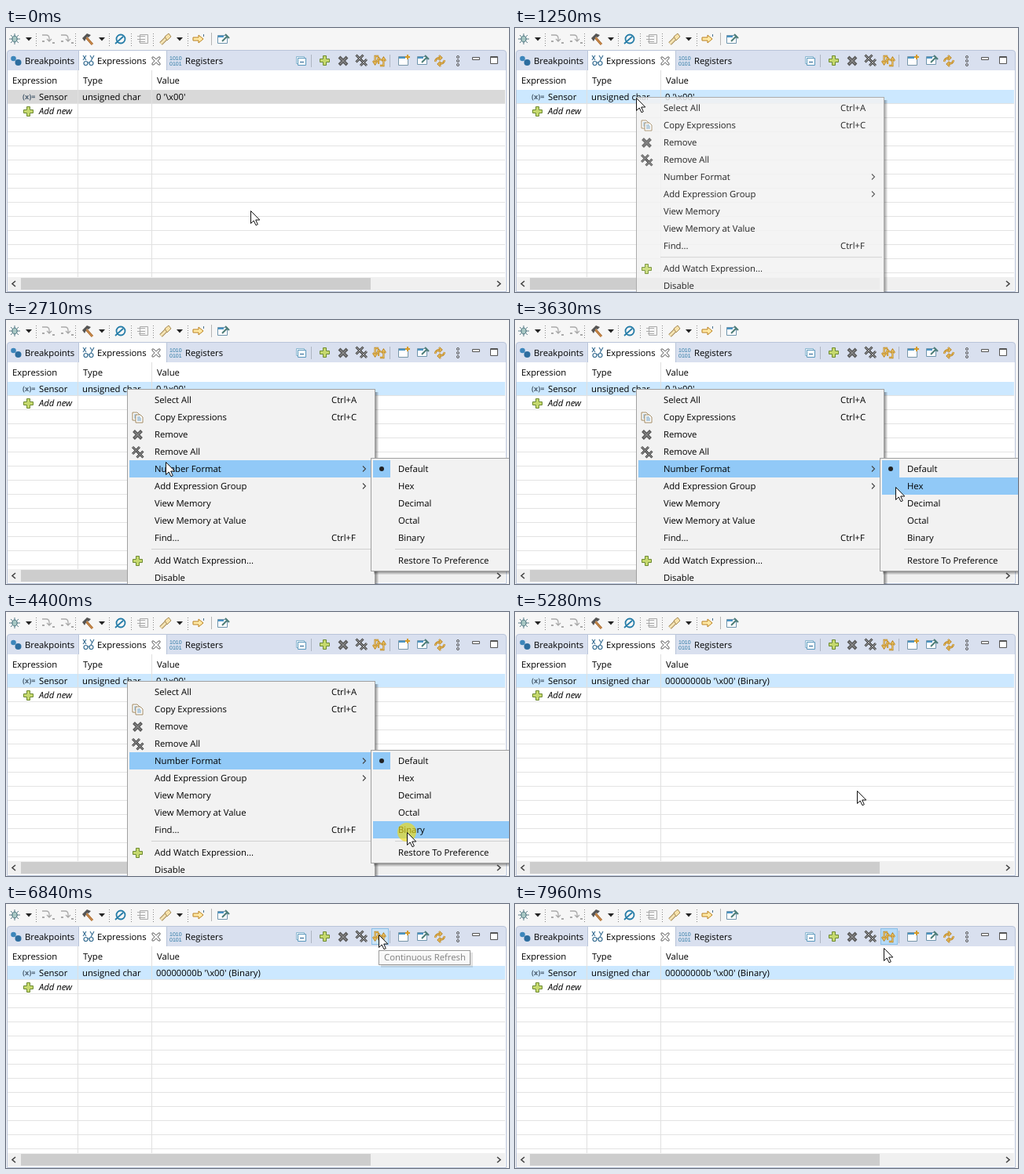
Recreate the animation shown at these times as an HTML page with a canvas. Size 640 by 337 pixels, loop 8 s.

```html
<!DOCTYPE html>
<html lang="en">
<head>
<meta charset="utf-8">
<title>Expressions view</title>
<style>
html, body { margin: 0; width: 100%; height: 100%; overflow: hidden; background: #f6f6f6; }
canvas { display: block; }
</style>
</head>
<body>
<canvas id="stage" width="640" height="337"></canvas>
<script>
const LOOP = 8000;
const HOT = '#91c9f7', GOLD = '#d59a25', GRAY = '#aaa';
const c = document.getElementById('stage').getContext('2d');

// Drawing helpers
const box = (color, x, y, w, h) => { c.fillStyle = color; c.fillRect(x, y, w, h); };
const frame = (color, x, y, w, h) => { c.strokeStyle = color; c.lineWidth = 1; c.strokeRect(x + .5, y + .5, w - 1, h - 1); };
const fill = (color, d) => { c.fillStyle = color; c.fill(new Path2D(d)); };
const stroke = (color, d, width = 1) => { c.strokeStyle = color; c.lineWidth = width; c.stroke(new Path2D(d)); };
const shape = (inside, edge, d) => { fill(inside, d); stroke(edge, d); };
const disc = (color, x, y, r) => { c.fillStyle = color; c.beginPath(); c.arc(x, y, r, 0, 7); c.fill(); };
function text(s, x, y, style = '', color = '#000') {
  c.font = style + ' 11.3px "Open Sans", "Noto Sans", sans-serif';
  c.fillStyle = color;
  c.fillText(s, x, y);
}
function at(x, y, draw) { c.save(); c.translate(x, y); draw(); c.restore(); }

// Icons, each drawn around its own centre
const icons = {
  bug() {
    stroke('#587d86', 'M-5-5L5 5M5-5L-5 5M-7 0H7M0-7V7');
    shape('#a9c8c4', '#47707c', 'M-3-2Q0-6 3-2V2Q0 6-3 2Z');
  },
  drop() { fill('#222', 'M-4-2H4L0 2.5Z'); },
  step() {
    stroke(GRAY, 'M-8-5H-3Q1-5 1-1V3M-2 0L1 3 4 0', 1.3);
    box(GRAY, -8, 2, 3, 2);
    box(GRAY, 5, 4, 3, 2);
  },
  hammer() {
    stroke('#a8642b', 'M-2-2L6 7', 3);
    stroke('#e0aa62', 'M-2-2L6 7');
    fill('#555', 'M-7-1L-1-7 4-5 1-2-1-3-4 3Z');
  },
  noEntry() {
    stroke('#267da8', 'M5.5 0A5.5 5.5 0 1 1-5.5 0A5.5 5.5 0 1 1 5.5 0M-7 6L3-3', 1.8);
  },
  list() {
    shape('#f4f4f4', GRAY, 'M-3.5-5.5H6.5V5.5H-3.5Z');
    stroke(GRAY, 'M-7-3.5H3M-7 .5H3M-5 3.5H3');
  },
  torch() {
    stroke('#a58a55', 'M-6 6L1-1', 5);
    stroke('#f4e4b4', 'M-6 6L1-1', 3);
    shape('#f8e2aa', '#a58a55', 'M-1-3L4-7 7-3 2 2Z');
  },
  jump() {
    shape('#ffe9a5', '#bb8120', 'M-6-2H1V-5L7 0 1 5V2H-6Z');
    stroke('#47708e', 'M7.5-6V-3');
  },
  pinned() {
    shape('#fff', '#6f94ad', 'M-7.5-4.5H4.5V5.5H-7.5Z');
    box('#4a94c3', -7, -4, 7, 2);
    stroke('#4d7d78', 'M-2 3L5-4M2-6L7-1', 2);
  },
  glasses() {
    stroke('#356c91', 'M-7-6L-3 0M-3-6L-7 0M2-6L4.5-2M7-6L3 1', 1.1);
    stroke('#356c91', 'M-1 4A2.5 2.5 0 1 1-6 4A2.5 2.5 0 1 1-1 4M6 4A2.5 2.5 0 1 1 1 4A2.5 2.5 0 1 1 6 4M-1 3H1', 1.2);
  },
  close() { stroke('#555', 'M-5-5L-3-5 0-2 3-5 5-5 5-3 2 0 5 3 5 5 3 5 0 2-3 5-5 5-5 3-2 0-5-3Z', .9); },
  collapse() {
    shape('#eaf4fa', '#8bb6d0', 'M-6.5-5.5H3.5V3.5H-6.5Z');
    shape('#fff', '#5a97bc', 'M-4.5-3.5H5.5V5.5H-4.5Z');
    box('#205f91', -2, 1, 5, 1);
  },
  plus() { shape('#c6d96e', '#6d8a32', 'M-2-6H2V-2H6V2H2V6H-2V2H-6V-2H-2Z'); },
  remove() {
    stroke('#555', 'M-5-5L5 5M5-5L-5 5', 4);
    stroke('#888', 'M-4-4L4 4M4-4L-4 4', 1.5);
  },
  removeAll() {
    for (const [x, y, r] of [[-2, -2, 4.5], [3, 3, 4]]) at(x, y, () => {
      const d = `M${-r} ${-r}L${r} ${r}M${r} ${-r}L${-r} ${r}`;
      stroke('#4a4a4a', d, 3);
      stroke('#a5a5a5', d);
    });
  },
  refresh() {
    const d = 'M-1-6H-6V3M-9 0L-6 4-3 0M1 6H6V-3M3 0L6-4 9 0M-1 4V-2M-3 0L-1-4 2-1';
    at(0, 0, () => {
      c.scale(.9, 1);
      stroke('#b8801c', d, 2.4);
      stroke('#f3cf72', d, .9);
    });
  },
  newView() {
    shape('#fff', '#7896a8', 'M-6.5-4.5H5.5V6.5H-6.5Z');
    box('#4a94c3', -6, -4, 8, 2);
    stroke(GOLD, 'M5-7V-1M2-4H8', 2);
  },
  cycle() {
    const d = 'M-6 1Q-5-4 1-4M-1-7L2-4-1-1M6-1Q5 4-1 4M1 1L-2 4 1 7';
    stroke('#b8801c', d, 2.4);
    stroke('#f3cf72', d, .9);
  },
  more() { for (const y of [-5, 0, 5]) stroke('#555', `M1.5 ${y}a1.5 1.5 0 1 1-3 0a1.5 1.5 0 1 1 3 0`); },
  copy() {
    for (const [x, y] of [[-6.5, -6.5], [-2.5, -3.5]]) at(x, y, () => {
      shape('#fff', '#a28a62', 'M0 0H6L9 3V10H0Z');
      stroke('#6999bd', 'M2 3H6M2 5H7M2 7H7');
    });
  }
};
const icon = (name, x, y) => at(x, y, icons[name]);

function toolbar() {
  box('#f6f6f6', 0, 0, 640, 337);
  for (const x of [38, 88, 131, 159, 187, 231])
    for (let y = 7; y < 23; y += 3) box('#888', x, y, 1, 1);
  box('#b5b5b5', 261, 6, 1, 16);
  for (const x of [29, 122, 221]) icon('drop', x, 14);
  icon('bug', 11, 14);
  icon('step', 54, 14);
  icon('step', 78, 14);
  icon('hammer', 104, 14);
  icon('noEntry', 146, 14);
  icon('list', 174, 14);
  icon('torch', 203, 14);
  icon('jump', 244, 14);
  icon('pinned', 277, 14);
}

function tabs(button) {
  shape('#d9e0ef', '#b9c4d9', 'M1.5 336.5V32Q1.5 28.5 5 28.5H633Q636.5 28.5 636.5 32V336.5Z');
  shape('#fff', '#b9c4d9', 'M92.5 54V28.5H204.5V54');
  disc('#3c86bb', 9.5, 39, 3.3);
  disc('#2c6d9f', 15.5, 44, 4);
  text('Breakpoints', 24, 46);
  icon('glasses', 105, 41);
  text('Expressions', 116, 46);
  icon('close', 191, 42);
  c.font = '7px "Liberation Sans", sans-serif';
  c.fillStyle = '#2876a3';
  c.fillText('1010', 208, 41);
  c.fillText('0101', 208, 48);
  text('Registers', 228, 46);

  if (button) {
    box(button, 465, 31, 22, 21);
    frame('#8abfe8', 465, 31, 22, 21);
  }
  box('#aeb5c2', 388, 34, 1, 16);
  box('#aeb5c2', 488, 34, 1, 16);
  icon('collapse', 376, 42);
  icon('plus', 405.5, 41.5);
  icon('remove', 429, 42);
  icon('removeAll', 452, 41);
  icon('refresh', 475, 42);
  icon('newView', 506, 41);
  icon('pinned', 531, 41);
  icon('cycle', 552, 42);
  icon('more', 575, 42);
  shape('#fff', '#555', 'M593.5 37.5H602.5V40.5H593.5Z');
  shape('#fff', '#555', 'M616.5 36.5H625.5V45.5H616.5Z');
  box('#555', 616, 37, 10, 1);
}

function table(rowColor, value) {
  box('#fff', 2, 54, 634, 282);
  box(rowColor, 2, 79, 633, 17);
  for (let y = 96; y < 318; y += 18) box('#e3e3e3', 2, y, 633, 1);
  box('#e0e0e0', 91, 54, 1, 264);
  box('#e0e0e0', 185, 54, 1, 264);
  text('Expression', 8, 71);
  text('Type', 98, 71);
  text('Value', 192, 71);
  c.font = 'bold 9px "Open Sans", sans-serif';
  c.fillStyle = '#4c5f70';
  c.fillText('(x)=', 21, 91);
  text('Sensor', 42, 92);
  text('unsigned char', 97, 92);
  text(value, 191, 92);
  icon('plus', 28.5, 106.5);
  text('Add new', 42, 110, 'italic');

  box('#f0f0f0', 2, 318, 633, 17);
  box('#cdcdcd', 19, 319, 445, 15);
  stroke('#444', 'M12 323L8 326.5 12 330M625 323L629 326.5 625 330', 1.6);
}

// Each entry: label, row centre, extra (shortcut or '>'), icon
const mainItems = [
  ['Select All', 102, 'Ctrl+A'], ['Copy Expressions', 124, 'Ctrl+C', 'copy'],
  ['Remove', 146, '', 'remove'], ['Remove All', 168, '', 'removeAll'],
  ['Number Format', 190, '>'], ['Add Expression Group', 212, '>'],
  ['View Memory', 234], ['View Memory at Value', 256], ['Find...', 278, 'Ctrl+F'],
  ['Add Watch Expression...', 307, '', 'plus'], ['Disable', 329]
];
const subItems = [
  ['Default', 190], ['Hex', 212], ['Decimal', 234], ['Octal', 256],
  ['Binary', 278], ['Restore To Preference', 307]
];

function menu(items, x, y, w, h, hotY, bullet) {
  // Soft shadow along the right and bottom edges
  for (let i = 0; i < 4; i++) {
    const shade = `rgba(0,0,0,${.36 - i * .09})`;
    box(shade, x + w + i, y + 4, 1, h - 4 + i);
    box(shade, x + 4, y + h + i, w - 4 + i, 1);
  }
  box('#f2f2f2', x, y, w, h);
  frame('#a0a0a0', x, y, w, h);
  box('#d0d0d0', x + 31, 292, w - 34, 1);
  if (bullet) box(HOT, x + 3, 179, 22, 22);
  for (const [label, mid, extra = '', pic] of items) {
    if (Math.abs(hotY - mid) <= 11) box(HOT, x + 3, mid - 11, w - 6, 22);
    if (pic) icon(pic, x + 13.5, mid + .5);
    text(label, x + 35, mid + 4);
    if (extra === '>') stroke('#444', `M${x + 300} ${mid - 3.5}l3.5 3.5-3.5 3.5`, 1.1);
    else text(extra, x + 260, mid + 4);
  }
  if (bullet) disc('#222', x + 14, 190, 3);
}

function tooltip(alpha) {
  c.globalAlpha = alpha;
  box('rgba(0,0,0,.15)', 477, 62, 117, 19);
  box('#fff', 474, 59, 117, 19);
  frame('#767676', 474, 59, 117, 19);
  text('Continuous Refresh', 481, 72, '', '#575757');
  c.globalAlpha = 1;
}

// Pointer moves: start, end, number of steps, destination
const moves = [
  [120, 680, 6, 154, 89], [1590, 2380, 8, 203, 181], [2930, 3730, 8, 497, 214],
  [3840, 4060, 3, 510, 281], [4950, 5280, 4, 435, 228], [5390, 5730, 4, 440, 93],
  [5850, 5950, 2, 442, 51], [6060, 6400, 4, 474, 39], [7960, 7960, 1, 469, 56]
];
function pointer(t) {
  let x = 311, y = 233;
  for (const [start, end, n, toX, toY] of moves) {
    if (t < start) break;
    let k = t >= end ? 1 : (1 + Math.floor((t - start) / (end - start) * (n - 1))) / n;
    if (n > 4) k *= k * (3 - 2 * k);
    x += (toX - x) * k;
    y += (toY - y) * k;
  }
  return [Math.round(x), Math.round(y)];
}

const during = (t, from, to) => t >= from && t < to;

function draw(t) {
  const [x, y] = pointer(t);
  const overButton = x > 465 && y < 52;
  const button = t >= 7390 ? '#b5daf8' : overButton ? '#cce4f7' : '';

  toolbar();
  tabs(button);
  table(t < 680 ? '#d9d9d9' : '#cce8ff', t < 4950 ? "0 '\\x00'" : "00000000b '\\x00' (Binary)");

  if (during(t, 1140, 4950)) {
    c.globalAlpha = t < 1250 ? .45 : t < 1350 ? .85 : 1;
    const subOpen = t >= 2710;
    menu(mainItems, 154, 88, 316, 260, subOpen ? 190 : y < 91 ? 0 : y);
    c.globalAlpha = 1;
    if (subOpen) menu(subItems, 464, 176, 186, 145, x < 467 ? 0 : y, true);
  }
  if (during(t, 6730, 7390)) tooltip(t < 6840 ? .35 : t < 6960 ? .75 : 1);
  if (during(t, 920, 1140) || during(t, 4400, 4950) || during(t, 7390, 7630))
    disc('rgba(240,220,20,.65)', x, y, 12);

  at(x + .5, y + .5, () => shape('#fff', '#111', 'M0 0V16L3.7 12.5 6.5 18.3 8.8 17.2 6.2 11.5H11.3Z'));
}

function tick(now) {
  draw(now % LOOP);
  requestAnimationFrame(tick);
}
c.textRendering = 'geometricPrecision';
requestAnimationFrame(tick);
</script>
</body>
</html>
```
